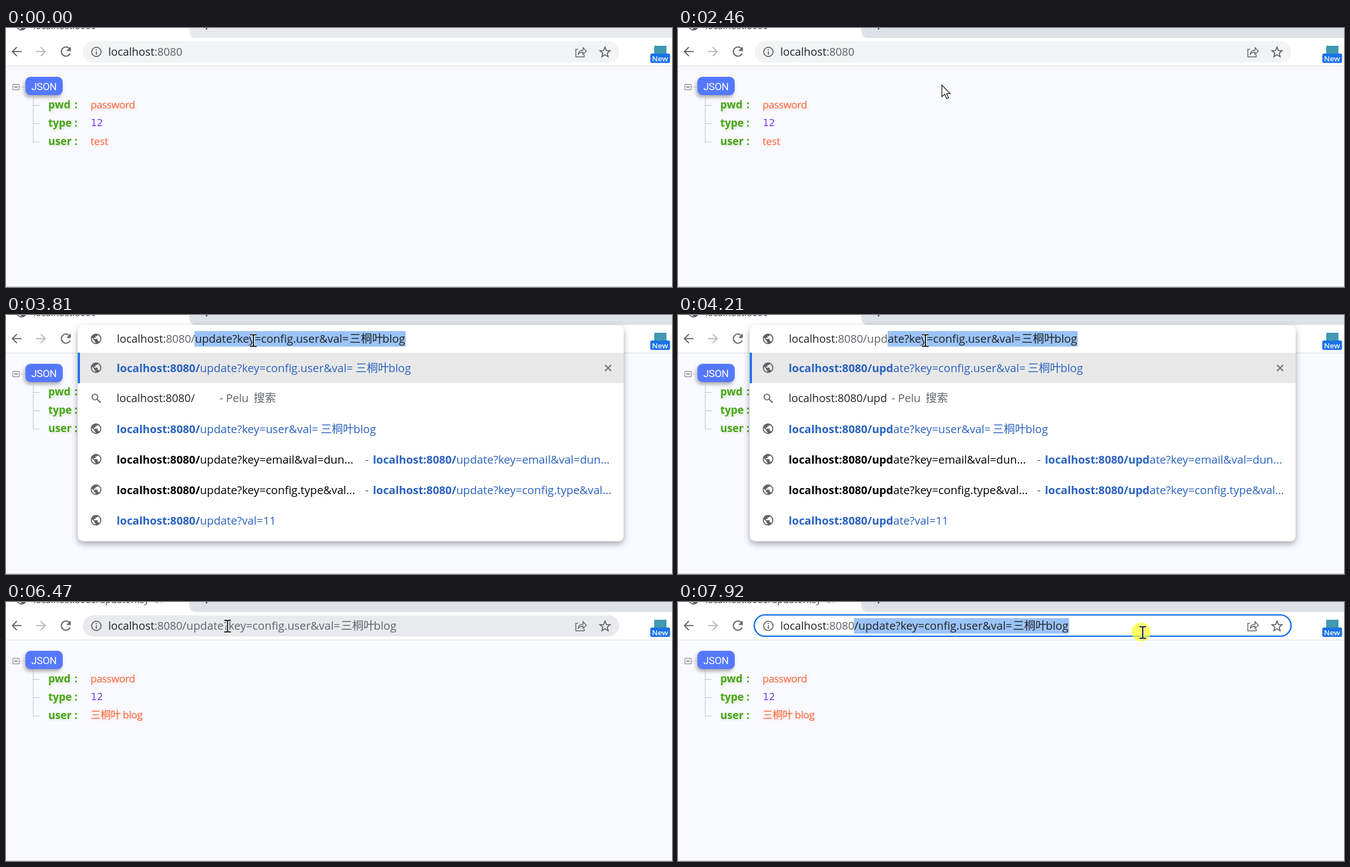
An HTML page that plays this animation: 1198 px wide and 467 px high, repeating every 7990 ms.

```html
<!DOCTYPE html>
<html lang="zh">
<head>
<meta charset="utf-8">
<title>localhost:8080</title>
<style>
  html, body { margin: 0; width: 100%; height: 100%; overflow: hidden; background: #f9faff; }
  svg { display: block; width: 1198px; height: 467px; }
  text { font-family: "Open Sans", "Noto Sans CJK SC", "Noto Sans CJK", sans-serif; font-size: 20px; white-space: pre; }
  .cjk { font-family: "Noto Sans CJK SC", "Noto Sans CJK", sans-serif; font-weight: 300; }
  .key { font-weight: 700; font-size: 19px; fill: #4aa415; filter: drop-shadow(2px 2px 2px #d0e3c8); }
  .val { font-size: 18.6px; letter-spacing: -.5px; fill: #fb6238; filter: drop-shadow(2px 2px 2px #f8dcd5); }
  .num { font-family: "DejaVu Sans", sans-serif; font-size: 17.4px; fill: #7a3cf0; }
  .line { fill: none; stroke: #5f6368; stroke-width: 2; }
  .dots { fill: none; stroke: #888; stroke-width: 1; stroke-dasharray: 1 1; }
  .bold { font-weight: 700; }
  .link { fill: #2a62bf; }
  .row { font-size: 20.2px; }
</style>
</head>
<body>
<svg id="stage" viewBox="0 0 1198 467"></svg>
<script>
const LOOP = 7990;
const NAME = ["三桐叶", "blog"];
const PATH = "/update?key=config.user&val=";
const PREFIX = "localhost:8080";

const GLOBE = "M12 2C6.5 2 2 6.5 2 12s4.5 10 10 10 10-4.5 10-10S17.5 2 12 2zm-1 17.9c-4-.5-7-3.8-7-7.9 0-.6.1-1.2.2-1.8L9 15v1c0 1.1.9 2 2 2zm6.9-2.5c-.3-.8-1-1.4-1.9-1.4h-1v-3c0-.6-.4-1-1-1H8v-2h2c.6 0 1-.4 1-1V7h2c1.1 0 2-.9 2-2v-.4c2.9 1.2 5 4 5 7.4 0 2.1-.8 4-2.1 5.4z";

const rect = (x, y, w, h, fill, more = "") =>
  `<rect x="${x}" y="${y}" width="${w}" height="${h}" fill="${fill}" ${more}/>`;
const path = (d, more = 'class="line"') => `<path d="${d}" ${more}/>`;
const text = (x, y, str, more = "") => `<text x="${x}" y="${y}" ${more}>${str}</text>`;
const esc = s => s.replace(/&/g, "&amp;");
const globe = (x, y, more = "") =>
  `<g ${more}>${path(GLOBE, `fill="#5f6368" transform="translate(${x - 11.4} ${y - 11.4}) scale(.95)"`)}</g>`;
const cross = (x, y, r, more) => path(`M${x - r} ${y - r}l${2 * r} ${2 * r}m0 ${-2 * r}l${-2 * r} ${2 * r}`, more);
const name = (x, gap) => `<tspan x="${x}" class="cjk">${NAME[0]}</tspan><tspan x="${x + gap}">${NAME[1]}</tspan>`;

function urlText(hostFill, restFill) {
  return text(184, 50, `<tspan fill="${hostFill}">localhost</tspan>:8080`, `fill="${restFill}" style="font-size:19.8px"`) +
    text(317, 50, esc(PATH) + name(602.5, 59), `class="tail" fill="${restFill}" style="font-size:20.3px"`);
}

const starPoints = Array.from({ length: 10 }, (_, i) => {
  const r = i % 2 ? 4.2 : 9.6, a = i * Math.PI / 5;
  return `${1077.5 + r * Math.sin(a)},${44 - r * Math.cos(a)}`;
}).join(" ");

function page() {
  const keys = ["pwd", "type", "user"].map((k, i) => {
    const y = 145 + 33 * i;
    return path(`M49 ${y - 5.5}H61`, 'class="dots"') + text(76, y, k, 'class="key"') + text(123, y, ":", 'class="key"');
  }).join("");
  return rect(0, 69, 1198, 398, "#f9faff") +
    rect(12.5, 101.5, 11, 10, "#fff", 'stroke="#777"') + path("M15 106.5h6", 'stroke="#222"') +
    path("M25 106.5H35M49 122V205", 'class="dots"') +
    rect(35, 88, 67, 33, "#5478ff", 'rx="9" style="filter:drop-shadow(-2px 4px 3px #aaa)"') +
    text(45.5, 112, "JSON", 'fill="#fff" style="font-family:Roboto,sans-serif;font-size:18.4px;letter-spacing:-.3px"') +
    keys +
    text(152, 145, "password", 'class="val"') +
    text(152.5, 177, "12", 'class="num"') +
    text(152, 211, "test", 'class="val" id="userOld" style="letter-spacing:-.1px"') +
    text(152, 210, name(152, 58), 'class="val" id="userNew"') +
    rect(0, 466, 1198, 1, "#c4c4c6");
}

function toolbar() {
  return rect(0, 0, 1198, 68, "#fff") + rect(0, 68, 1198, 1, "#dadce0") +
    path("M330 0H1198V18H341Q331 18 330 6Z", 'id="strip"') +
    rect(359.5, 0, 2.5, 2.5, "#3c4043") +
    globe(28, -5, 'id="favicon"') +
    text(49, 2, PREFIX, 'id="tabOld" fill="#3c4043" style="font-size:16.8px"') +
    text(49, 2, "localhost:8080/update?key=config", 'id="tabNew" fill="url(#fade)" style="font-size:16.8px"') +
    path("M28 42.5H12M19.5 34.5l-8 8 8 8") +
    path("M54 42.5H70M62.5 34.5l8 8-8 8", 'class="line" style="stroke:#b4b6b9"') +
    `<g id="reload">${path("M114.2 37.5A8.2 8.2 0 1 0 115.2 46")}${path("M116.5 33.5v8h-8z", 'fill="#5f6368"')}</g>` +
    cross(107, 42.5, 7.5, 'class="line" id="stop"') +
    rect(1166, 32, 22, 22, "#3f9ab0") + rect(1159, 46, 35.5, 17, "#1a73e8", 'rx="3"') +
    text(1162, 59.5, "New", 'fill="#fff" style="font-size:13.4px;font-weight:600"');
}

function omnibox() {
  return rect(138, 24, 965, 38, "#f1f3f4", 'rx="19" id="pill"') +
    rect(137.2, 23.2, 965.6, 38.6, "#fff", 'rx="19.3" stroke="#1a73e8" stroke-width="2.6" id="ring"') +
    `<g id="boxIcons"><circle cx="162.5" cy="43" r="8.4" class="line" style="stroke-width:1.8"/>` +
    path("M162.5 42v6M162.5 38v2") +
    path("M1029 38.5H1025V52H1040V48M1029 48Q1030 40 1038 40V35.5L1044 42 1038 47.5V43.5Q1032 43.5 1029 48Z", 'class="line" style="stroke-width:1.5"') +
    `<polygon points="${starPoints}" class="line" style="stroke-width:1.8"/></g>`;
}

function menu() {
  const pre = `<tspan class="bold pre" style="font-size:19.9px"></tspan><tspan class="post"></tspan>`;
  const row = (i, tail, cls, x = 199) =>
    text(x, 103 + 55 * i, pre, `class="row ${cls}" data-tail="${esc(tail)}"`);
  const icons = [0, 2, 3, 4, 5].map(i => globe(162, 95 + 55 * i)).join("");
  const email = "update?key=email&val=dun...", type = "update?key=config.type&val...";
  return `<g id="menu">` +
    rect(129, 18, 982, 390, "#fff", 'rx="10" style="filter:drop-shadow(0 5px 6px #0005)"') +
    rect(129, 68, 982, 55, "#e8e8e8") + rect(129, 68, 4, 55, "#1a73e8") +
    globe(162, 43) + icons +
    `<circle cx="160" cy="148" r="5.2" class="line" style="stroke-width:1.8"/>` + path("M164 152l6.5 6.5") +
    cross(1083, 95.5, 5.5) +
    row(0, "update?key=config.user&val=", "link") +
    text(629, 103, name(629, 59), 'class="link row" style="font-size:20px"') +
    text(199, 157, "", 'id="query" fill="#202124" style="font-size:19.8px"') +
    text(384, 157, '- Pelu <tspan x="445.5" class="cjk">搜索</tspan>', 'fill="#5f6368"') +
    row(2, "update?key=user&val=", "link") +
    text(566, 213, name(566, 59), 'class="link row" style="font-size:20px"') +
    row(3, email, "") + text(646, 268, "-", 'fill="#5f6368"') + row(3, email, "link", 660) +
    row(4, type, "") + text(646, 323, "-", 'fill="#5f6368"') + row(4, type, "link", 660) +
    row(5, "update?val=11", "link") + `</g>`;
}

const beam = "M-6 -10.5H-2Q0 -10.5 0 -8.5V8.5Q0 10.5 -2 10.5H-6M6 -10.5H2Q0 -10.5 0 -8.5V8.5Q0 10.5 2 10.5H6";
const stage = document.getElementById("stage");
stage.innerHTML = `<defs>
  <linearGradient id="fade" gradientUnits="userSpaceOnUse" x1="250" x2="294">
    <stop stop-color="#3c4043"/><stop offset="1" stop-color="#3c4043" stop-opacity="0"/>
  </linearGradient>
  <clipPath id="selClip">${rect(0, 29, 0, 28, "#000", 'class="sel"')}</clipPath></defs>` +
  page() + toolbar() + omnibox() + menu() +
  `<g id="url">${urlText("#202124", "#5f6368")}${rect(0, 29, 0, 28, "#9bc3f7", 'class="sel"')}` +
  `<g clip-path="url(#selClip)">${urlText("#202124", "#202124")}</g></g>` +
  rect(318, 31, 1.4, 24, "#202124", 'id="caret"') +
  `<g id="cursor"><circle id="glow" cx="-3" cy="-1" r="17" fill="#ffff28" fill-opacity=".72"/>
   <g id="beam">${path(beam, 'fill="none" stroke="#fff" stroke-width="4"')}${path(beam, 'fill="none" stroke="#111" stroke-width="2"')}</g>
   ${path("M0 0V21L5 16.5 8.5 24.5 12 23 8.5 15.5H15Z", 'id="arrow" fill="#fff" stroke="#111" stroke-width="1.3"')}</g>`;

const el = {};
stage.querySelectorAll("[id]").forEach(n => el[n.id] = n);
const sels = stage.querySelectorAll(".sel");
const tails = stage.querySelectorAll(".tail");
const rows = stage.querySelectorAll("[data-tail]");

// time, x, y
const MOVES = [
  [1990, 540, 228], [2740, 445, 46], [5920, 445, 46], [6680, 388, 43],
  [7440, 323, 37], [7520, 318, 42], [7580, 322, 43], [7920, 836, 55]
];
// time, typed text, where the completion begins
const TYPED = [[3810, "/", 339], [4070, "/u", 352], [4140, "/up", 364.5], [4210, "/upd", 377]];

const show = (node, on) => node.style.display = on ? "" : "none";
const within = (t, a, b) => t >= a && t < b;

function cursorAt(t) {
  const i = MOVES.findIndex(m => m[0] > t);
  if (i < 0) return MOVES.at(-1).slice(1);
  if (!i) return MOVES[0].slice(1);
  const [t0, x0, y0] = MOVES[i - 1], [t1, x1, y1] = MOVES[i];
  const k = (t - t0) / (t1 - t0), e = k * k * (3 - 2 * k);
  return [x0 + (x1 - x0) * e, y0 + (y1 - y0) * e];
}

let shownTyped = "";
function setTyped(typed) {
  if (typed === shownTyped) return;
  shownTyped = typed;
  el.query.textContent = PREFIX + typed;
  rows.forEach(r => {
    r.querySelector(".pre").textContent = PREFIX + typed;
    r.querySelector(".post").textContent = r.dataset.tail.slice(typed.length - 1);
  });
}

function draw(t) {
  const open = within(t, 3810, 5110);
  const loading = within(t, 1850, 1990) || within(t, 5110, 5320);
  const updated = t >= 5250;
  const focused = within(t, 2810, 3810) || t >= 7520;
  const [x, y] = cursorAt(t);
  const hover = (within(t, 1990, 2810) && y < 62) || within(t, 5920, 7520);

  el.strip.setAttribute("fill", t < 880 ? "#e8eaed" : "#dee1e6");
  el.pill.setAttribute("fill", hover ? "#e8eaed" : "#f1f3f4");
  show(el.favicon, !loading);
  show(el.reload, !loading);
  show(el.stop, loading);
  show(el.tabOld, !updated);
  show(el.tabNew, updated);
  show(el.userOld, !updated);
  show(el.userNew, updated);
  show(el.ring, focused);
  show(el.menu, open);
  show(el.caret, within(t, 3530, 3810));
  tails.forEach(n => show(n, t >= 3810));
  el.url.setAttribute("transform", `translate(${open ? 15.5 : 0} 0)`);

  let from = 0, to = 0;
  if (within(t, 2810, 3530)) [from, to] = [184, 318];
  if (open) {
    const [, typed, at] = TYPED.findLast(k => k[0] <= t);
    setTyped(typed);
    [from, to] = [at - 15.5, 703.5];
  }
  if (t >= 7580) [from, to] = [316.5, Math.min(Math.max(x, 316.5), 703.5)];
  sels.forEach(s => {
    s.setAttribute("x", from);
    s.setAttribute("width", to - from);
  });

  show(el.cursor, t >= 1990);
  el.cursor.setAttribute("transform", `translate(${x} ${y})`);
  show(el.beam, y < 66);
  show(el.arrow, y >= 66);
  show(el.glow, within(t, 2810, 2950) || t >= 7520);
}

const start = performance.now();
function tick() {
  draw((performance.now() - start) % LOOP);
  requestAnimationFrame(tick);
}
tick();
</script>
</body>
</html>
```
